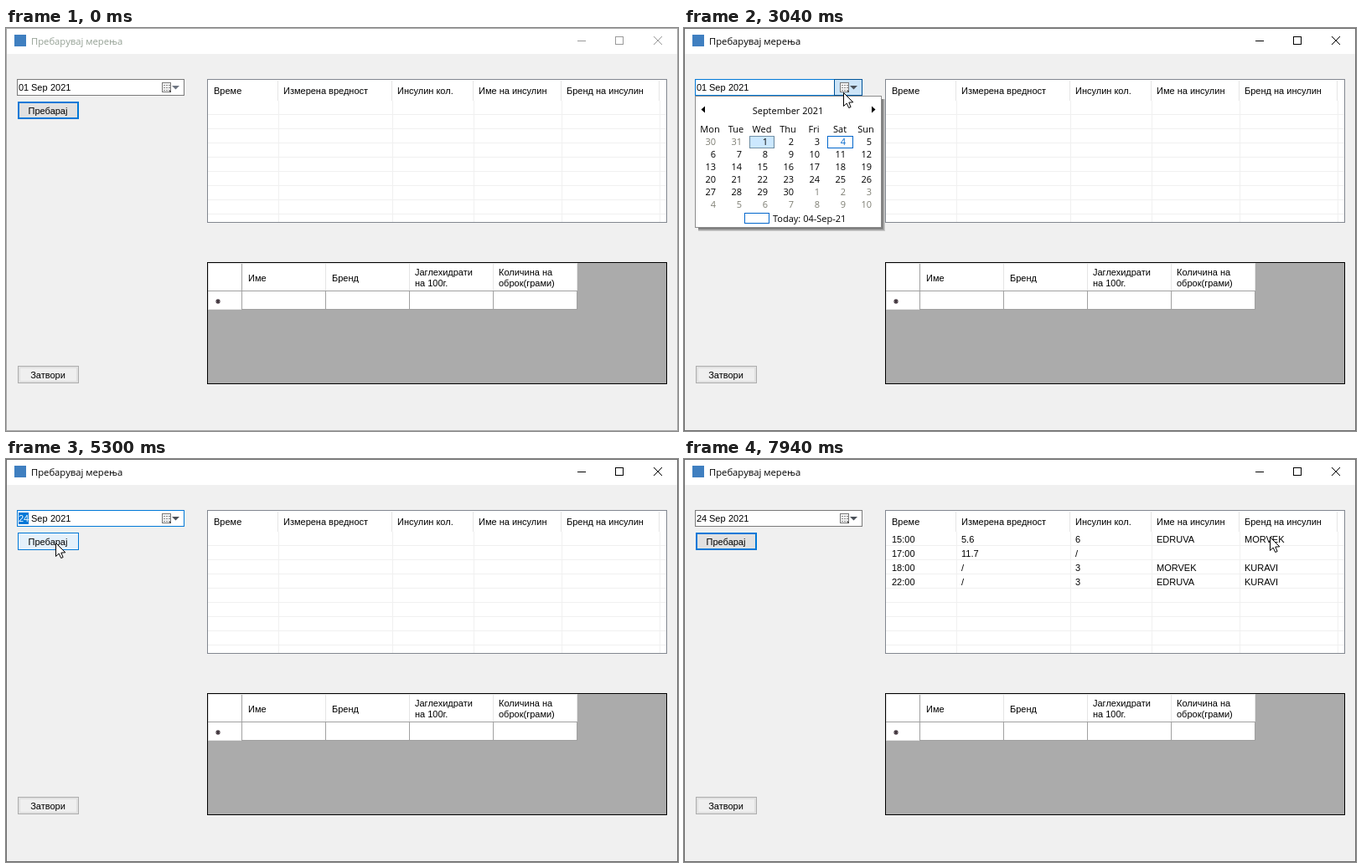
Animation, 802 px wide and 482 px high, one loop 8000 ms. Source, as an HTML page with a canvas:

```html
<!DOCTYPE html>
<html lang="mk">
<head>
<meta charset="utf-8">
<title>Пребарувај мерења</title>
<style>
html, body { margin: 0; width: 100%; height: 100%; overflow: hidden; background: #f0f0f0; }
canvas { display: block; }
</style>
</head>
<body>
<canvas id="stage" width="802" height="482"></canvas>
<script>
const ctx = document.getElementById('stage').getContext('2d');
const LOOP = 8000, SHOW = 220, OPEN = 2470, PICK = 4260, PRESS = 5860, RESULT = 6030;
const UI = '11px "Liberation Sans", Arial, sans-serif';
const CAL = '11px "Open Sans", "Noto Sans", sans-serif';
const TITLE = '11.25px "Open Sans", "Noto Sans", sans-serif';
const BLUE = '#0078d7', LINK = '#0066cc';

// pointer stops: time, x, y
const stops = [
  [0, 734, 477], [892, 734, 477], [1180, 640, 428], [1490, 402, 246], [1710, 325, 188],
  [2120, 226, 120], [2420, 200, 74], [2470, 199, 68], [2639, 199, 68], [2640, 200, 72],
  [2922, 200, 72], [3210, 166, 97], [3390, 171, 132], [3564, 178, 160], [3730, 167, 172],
  [4090, 161, 179], [4422, 161, 179], [4850, 97, 126], [5190, 60, 99], [5299, 60, 99],
  [5300, 59, 100], [6279, 59, 100], [6280, 58, 99], [6612, 58, 99], [6900, 176, 104],
  [7200, 320, 109], [7470, 459, 107], [7940, 699, 93], [8000, 699, 93]
];
// the pointer advances in even steps: start, end, count
const moves = [[950, 2470, 27], [2980, 4090, 20], [4480, 5190, 13], [6670, 7940, 23]];

function stepTime(t) {
  for (const [a, b, n] of moves) {
    const d = (b - a) / (n - 1);
    if (t >= a - d && t < a) return a - d;
    if (t >= a && t <= b) return Math.min(b, a + Math.floor((t - a) / d + 0.15) * d);
  }
  return t;
}

function slope(i, k) {
  const p = stops[i - 1], c = stops[i], n = stops[i + 1];
  if (!p || !n) return 0;
  if ((p[1] === c[1] && p[2] === c[2]) || (n[1] === c[1] && n[2] === c[2])) return 0;
  return (n[k] - p[k]) / (n[0] - p[0]);
}

function pointer(t) {
  t = stepTime(t);
  let i = 0;
  while (i < stops.length - 2 && t >= stops[i + 1][0]) i++;
  const a = stops[i], b = stops[i + 1], h = b[0] - a[0], u = (t - a[0]) / h;
  const at = k => {
    const m = slope(i, k) * h, n = slope(i + 1, k) * h, d = b[k] - a[k];
    return Math.round(a[k] + u * (m + u * (3 * d - 2 * m - n + u * (m + n - 2 * d))));
  };
  return { x: at(1), y: at(2) };
}

const inside = (p, x, y, w, h) => p.x >= x && p.x < x + w && p.y >= y && p.y < y + h;

function fill(color, x, y, w, h) {
  ctx.fillStyle = color;
  ctx.fillRect(x, y, w, h);
}

function box(x, y, w, h, border, inner, line = 1) {
  fill(border, x, y, w, h);
  fill(inner, x + line, y + line, w - 2 * line, h - 2 * line);
}

function text(s, x, y, color = '#000', font = UI, align = 'left') {
  ctx.font = font;
  ctx.fillStyle = color;
  ctx.textAlign = align;
  ctx.fillText(s, x, y);
}

function shape(points, color) {
  ctx.beginPath();
  points.forEach(([x, y]) => ctx.lineTo(x, y));
  ctx.closePath();
  ctx.fillStyle = color;
  ctx.fill();
}

function drawWindow(active) {
  box(0, 0, 802, 482, active ? '#6e6e6e' : '#a6a6a6', '#f0f0f0');
  fill('#fff', 1, 1, 800, 30);
  fill('#3f7fc0', 10, 8, 14, 14);
  text('Пребарувај мерења', 30, 20, active ? '#000' : '#94a094', TITLE);
  const ink = active ? '#000' : '#999';
  fill(ink, 682, 15, 10, 1);
  box(727, 10, 10, 10, ink, '#fff');
  ctx.strokeStyle = ink;
  ctx.lineWidth = 1;
  ctx.beginPath();
  ctx.moveTo(773, 10); ctx.lineTo(783, 20);
  ctx.moveTo(783, 10); ctx.lineTo(773, 20);
  ctx.stroke();
}

function drawPicker(t, p) {
  const open = t >= OPEN && t < PICK, focus = t >= PICK && t < PRESS;
  const hover = inside(p, 13, 61, 200, 20);
  box(13, 61, 200, 20, open || focus ? BLUE : hover ? '#171717' : '#7a7a7a', '#fff');
  if (open) box(179, 61, 34, 20, '#005499', '#cce4f7');
  else if (hover && p.x >= 180) box(179, 61, 34, 20, BLUE, '#e5f1fb');
  if (focus) fill(BLUE, 15, 64, 12, 14);
  text(t < PICK ? '01' : '24', 15, 75, focus ? '#fff' : '#000');
  text('Sep', 30, 75);
  text('2021', 53, 75);
  box(186, 65, 11, 12, '#777', '#f4f4f4');
  for (let i = 0; i < 9; i++) fill('#8a8a8a', 188 + i % 3 * 3, 68 + Math.floor(i / 3) * 3, 2, 1);
  fill('#555', 195, 75, 2, 2);
  shape([[198, 69], [207, 69], [202.5, 73.5]], t < OPEN ? '#6d7480' : '#4a5058');
}

function drawCalendar(p) {
  for (let i = 4; i > 0; i--) fill('rgba(0,0,0,.16)', 17, 85, 219 + i, 154 + i);
  box(13, 81, 223, 158, '#8c8c8c', '#fff');
  const title = inside(p, 82, 92, 85, 14);
  text('September 2021', 124, 103, title ? LINK : '#000', CAL, 'center');
  shape([[25, 93.5], [25, 101.5], [20.5, 97.5]], '#000');
  shape([[224, 93.5], [224, 101.5], [228.5, 97.5]], '#000');
  'Mon Tue Wed Thu Fri Sat Sun'.split(' ').forEach((d, i) =>
    text(d, 31 + 31 * i, 125, '#000', CAL, 'center'));
  for (let i = 0; i < 42; i++) {
    const day = i - 1, x = 16 + 31 * (i % 7), y = 129 + 15 * Math.floor(i / 7);
    const other = day < 1 || day > 30, hot = inside(p, x, y, 31, 15);
    if (hot) fill('#e5f3ff', x, y + 1, 30, 14);
    if (day === 1) {
      fill('#cce8ff', x, y, 30, 15);
      ctx.setLineDash([1, 1]);
      ctx.strokeStyle = '#1a3a50';
      ctx.strokeRect(x + 0.5, y + 0.5, 29, 14);
      ctx.setLineDash([]);
    }
    if (day === 4) box(x, y, 31, 15, LINK, hot ? '#e5f3ff' : '#fff');
    const label = day < 1 ? day + 31 : day > 30 ? day - 30 : day;
    text(label, x + 22, y + 11, hot || day === 4 ? LINK : other ? '#7d7d72' : '#000', CAL, 'right');
  }
  box(72, 221, 30, 13, LINK, '#fff');
  text('Today: 04-Sep-21', 106, 232, '#000', CAL);
}

function drawButtons(t, p) {
  const focus = t < OPEN || t >= PRESS;
  if (t >= PRESS && t < RESULT) box(14, 88, 73, 21, '#005499', '#cce4f7');
  else if (inside(p, 14, 88, 73, 21)) box(14, 88, 73, 21, BLUE, '#e5f1fb');
  else box(14, 88, 73, 21, focus ? BLUE : '#adadad', '#e1e1e1', focus ? 2 : 1);
  text('Пребарај', 50, 103, '#000', UI, 'center');
  box(14, 404, 73, 21, '#adadad', '#e1e1e1');
  fill('#efefef', 17, 407, 67, 15);
  text('Затвори', 50, 419, '#000', UI, 'center');
}

const heads = ['Време', 'Измерена вредност', 'Инсулин кол.', 'Име на инсулин', 'Бренд на инсулин'];
const cols = [248, 331, 467, 564, 669];
const rows = [
  ['15:00', '5.6', '6', 'EDRUVA', 'MORVEK'],
  ['17:00', '11.7', '/', '', ''],
  ['18:00', '/', '3', 'MORVEK', 'KURAVI'],
  ['22:00', '/', '3', 'EDRUVA', 'KURAVI']
];

function drawList(filled) {
  box(240, 61, 549, 172, '#828790', '#fff');
  for (let y = 103; y < 232; y += 17) fill('#f0f0f0', 241, y, 547, 1);
  for (const x of [324, 460, 557, 662, 779]) {
    fill('#e5e5e5', x, 63, 1, 24);
    fill('#f0f0f0', x + 1, 87, 1, 145);
  }
  heads.forEach((s, i) => text(s, cols[i], 79));
  if (filled) rows.forEach((r, j) => r.forEach((s, i) => text(s, cols[i], 100 + 17 * j)));
}

function drawGrid() {
  box(240, 280, 549, 146, '#000', '#ababab');
  fill('#fff', 241, 281, 441, 56);
  fill('#e5e5e5', 241, 281, 441, 1);
  fill('#e5e5e5', 241, 281, 1, 56);
  fill('#e5e5e5', 241, 336, 41, 1);
  for (let x = 281; x < 700; x += 100) {
    fill(x === 281 ? '#a0a0a0' : '#e5e5e5', x, 282, 1, 32);
    fill('#a0a0a0', x, 314, 1, 23);
  }
  fill('#a0a0a0', 241, 314, 441, 1);
  fill('#a0a0a0', 281, 336, 401, 1);
  text('Име', 289, 303);
  text('Бренд', 389, 303);
  text('Јаглехидрати', 488, 296);
  text('на 100г.', 488, 309);
  text('Количина на', 588, 296);
  text('оброк(грами)', 588, 309);
  ctx.strokeStyle = '#3c3038';
  ctx.lineWidth = 1.2;
  ctx.beginPath();
  for (let i = 0; i < 4; i++) {
    const dx = 3 * Math.cos(i * Math.PI / 4), dy = 3 * Math.sin(i * Math.PI / 4);
    ctx.moveTo(253 - dx, 327 - dy);
    ctx.lineTo(253 + dx, 327 + dy);
  }
  ctx.stroke();
}

function drawPointer({ x, y }) {
  const arrow = [[0, 0], [0, 16], [3.7, 12.6], [6.2, 18], [8.6, 17], [6.3, 11.6], [11.3, 11.3]];
  shape(arrow.map(([a, b]) => [x + a + 0.5, y + b + 0.5]), '#fff');
  ctx.strokeStyle = '#000';
  ctx.lineWidth = 1;
  ctx.stroke();
}

function draw(t) {
  const p = pointer(t);
  drawWindow(t >= OPEN);
  drawList(t >= RESULT);
  drawGrid();
  drawButtons(t, p);
  drawPicker(t, p);
  // calendar highlights trail the pointer by one step
  if (t >= OPEN && t < PICK) drawCalendar(pointer(t - 58));
  if (t >= SHOW) drawPointer(p);
}

const start = performance.now();
function tick() {
  draw((performance.now() - start) % LOOP);
  requestAnimationFrame(tick);
}
tick();
</script>
</body>
</html>
```
